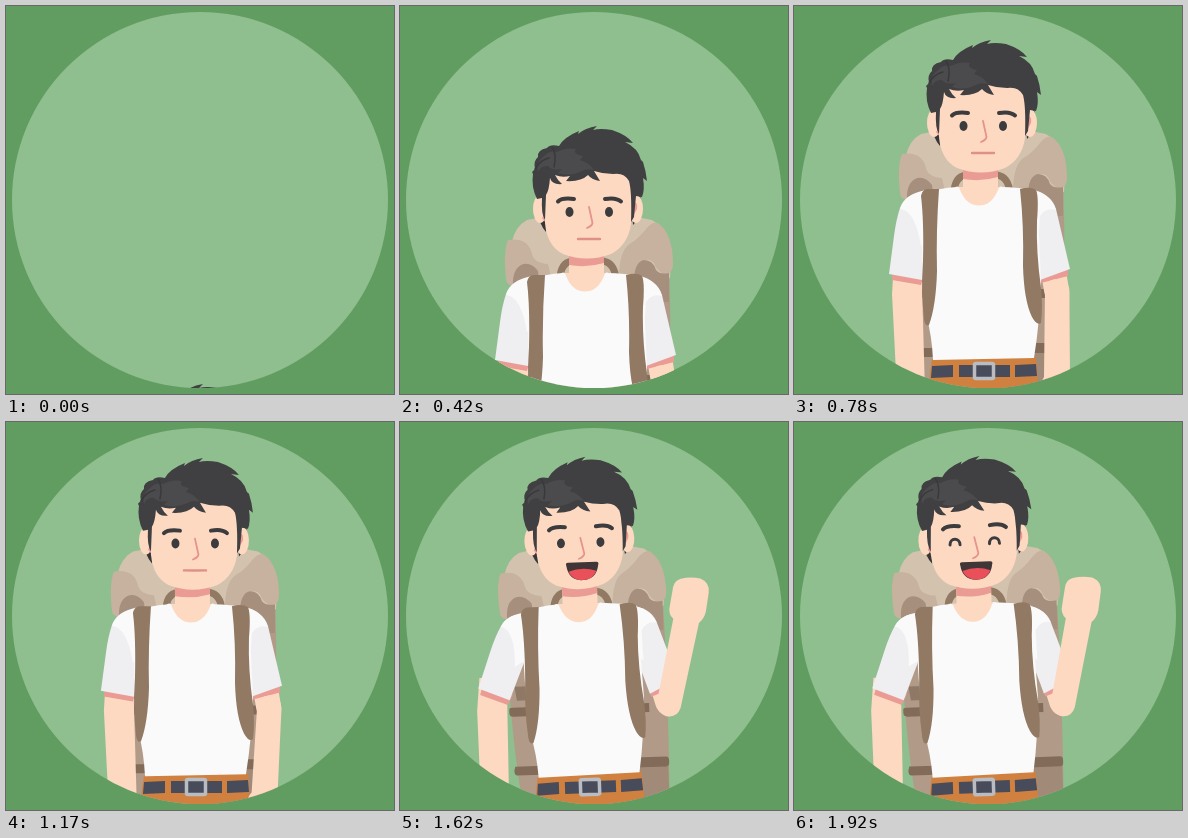
These frames come from a looping animation (388 by 388 pixels, 3 s). An HTML page:

```html
<!DOCTYPE html>
<html lang="en">
<head>
<meta charset="utf-8">
<title>Waving backpacker</title>
<style>
  html, body { margin: 0; width: 100%; height: 100%; overflow: hidden; background: #619d61; }
  svg { display: block; width: 100vw; height: 100vh; }
  .skin { fill: #fdd9c1; }
  .blush { fill: #ea9b93; }
  .white { fill: #fafafa; }
  .shade { fill: #efeef1; }
  .hair { fill: #404042; }
  .strap { fill: #927963; }
  .band { fill: #836b59; }
  .line { fill: none; stroke-linecap: round; stroke-linejoin: round; }
</style>
</head>
<body>
<svg viewBox="0 0 388 388">
  <defs><clipPath id="porthole"><circle cx="194" cy="194" r="188"/></clipPath></defs>
  <rect width="388" height="388" fill="#619d61"/>
  <circle cx="194" cy="194" r="188" fill="#8fbe8f"/>
  <g clip-path="url(#porthole)">
    <g id="person">
      <g id="pack">
        <path fill="#b19b88" d="M113 178L200 165H269Q272 270 269 384H123Q116 340 113 270Z"/>
        <path fill="#a18a78" d="M200 342H269V384H200Z"/>
        <path fill="#8f7966" d="M118 262H133V276H120Z"/>
        <path class="band" d="M112 285Q112 283 115 283H252V292H116Q112 292 112 288ZM116 342H150V351H118Q115 351 115 346ZM235 337H267Q270 337 270 341V343Q270 347 267 347H235Z"/>
        <path fill="#d3c2ae" d="M112 192Q104 140 127 128Q190 114 252 128Q274 140 270 186L210 192Z"/>
        <path fill="#c6b29e" d="M106 187Q103 160 108 148Q128 145 132 162Q134 171 148 172L152 190L115 194Q106 194 106 187Z"/>
        <path fill="#c6b29e" d="M219 182Q220 157 231 151Q238 147 246 137Q253 129 258 131Q273 142 273 172Q273 182 265 182Q257 180 254 171Q248 164 239 172L235 186Z"/>
        <path fill="#a68f7d" d="M113 195Q112 178 121 173Q130 169 138 179L140 195ZM234 190Q234 170 244 168Q253 168 256 178Q260 183 269 181V210H236Z"/>
        <path class="line" stroke="#927963" stroke-width="7" d="M160 188Q160 171 172 169H203Q215 171 216 188"/>
      </g>

      <g id="leftArm">
        <g id="leftForearm">
          <path class="skin" d="M100 255L98 288L103 386H131L128 280V255Z"/>
        </g>
        <path class="blush" d="M99 262L98 274L127 279L130 268Z"/>
        <path class="shade" d="M130 186Q111 188 106 202Q102 214 100 230L95 268L128 274L136 230Z"/>
        <path class="white" d="M132 184Q110 188 106 203Q121 204 127 240L138 230Z"/>
      </g>

      <g id="rightSleeve">
        <path class="line" stroke="#fdd9c1" stroke-width="25" d="M256 245L262.500 284"/>
        <path class="blush" d="M246 268L247 277L274 270L274 260Z"/>
        <path class="shade" d="M236 184Q257 187 262 203L276 263L246 274L236 230Z"/>
        <path class="white" d="M236 183Q257 187 262 204Q252 201 246 210L244 240L234 230Z"/>
      </g>

      <path fill="#d08140" d="M138 353L242 351L245 390H133Z"/>
      <g id="belt">
        <path fill="#484b5a" d="M138 360L159 359V371L137 372ZM165 359H216V371H165ZM221 359L242 358L243 370L221 371Z"/>
        <rect x="180.500" y="357.500" width="19" height="15" rx="1.500" fill="#484b5a" stroke="#b9bdc1" stroke-width="3.500"/>
      </g>

      <path class="white" d="M128 188Q145 182 163 181L206 181Q225 181 243 185L247 275Q246 315 240 352L139 354Q138 330 132 308Q127 260 128 188Z"/>
      <path class="strap" d="M127 190Q128 184 133 183H145Q142 225 143 265Q142 300 135 319Q131 321 130 313Q127 285 129 255Q130 215 127 190Z"/>
      <path class="strap" d="M226 183Q237 180 242 184Q245 190 243 215Q242 246 247 282Q249 301 247 317Q243 320 238 311Q230 295 229 260Q230 220 226 183Z"/>

      <path class="skin" d="M169 155H204V181H209Q203 200 185 200Q167 200 162 181H169Z"/>
      <path class="line" stroke="#fafafa" stroke-width="5" d="M163 183Q170 202 185 202T207 183"/>
      <path class="blush" d="M169 160H204V171Q187 176 169 173Z"/>

      <g id="head">
        <path fill="#363638" d="M136 85H242L239 126L233 133L229 90H147L146 140Q139 132 138 120Z"/>
        <ellipse class="skin" cx="140" cy="117" rx="7" ry="14"/>
        <ellipse class="skin" cx="236" cy="117" rx="7" ry="14"/>
        <path class="blush" d="M142 126L146 120V131ZM233 110Q238 109 237 117L232 126Z"/>
        <path class="skin" d="M144 70H231V132Q228 153 211 162Q187 171 163 162Q147 154 145 131Z"/>
        <path class="hair" d="M137 107Q131 95 133 82L132 80L135 77Q133 69 138 65Q137 58 147 56Q150 52 159 54Q164 45 179 39L178 42Q185 36 197 34L193 38Q200 36 212 38Q227 43 233 51L225 50Q238 56 241 68L243 70Q246 79 247 89L243 86Q245 98 242 105L236 104L234 125L231 130Q232 100 229 89Q224 80 213 82Q203 82 194 79L200 89Q192 88 188 83Q181 90 166 89L170 84Q162 86 155 83Q158 89 162 92Q152 93 150 86Q149 99 146 103L145 128Q141 122 142 106Z"/>
        <path fill="#4b4b4d" d="M138 80Q136 70 143 65Q150 58 157 60Q166 55 176 57Q172 62 183 64L180 68Q188 70 194 78Q186 76 182 79Q170 85 158 81L162 77Q152 79 148 74Q141 73 138 80Z"/>
        <path class="line" stroke="#39393b" stroke-width="1.500" d="M152 55Q157 62 154 75M135 77Q140 68 149 66"/>

        <g id="brows" class="line" stroke="#3c3c3e" stroke-width="4">
          <path d="M158 109.500Q162 105.500 174 107"/>
          <path d="M205 107Q216 105 221 109.500"/>
        </g>
        <g id="openEyes" fill="#3c3c3e">
          <ellipse id="eyeL" cx="169.500" cy="120" rx="4" ry="5"/>
          <ellipse id="eyeR" cx="209" cy="120" rx="4" ry="5"/>
        </g>
        <path id="happyEyes" class="line" stroke="#3c3c3e" stroke-width="3"/>
        <path class="line" stroke="#e6938a" stroke-width="1.800" d="M189 115L192.500 131Q192 134 187 136"/>
        <path id="smile" class="line" stroke="#df9186" stroke-width="2.400"/>
        <g id="laugh">
          <path fill="#403638" d="M176 140H204Q207 140 206 143Q204 158 190 158T174 143Q173 140 176 140Z"/>
          <path fill="#ea5059" d="M176 149Q190 144 204 149Q200 158 190 158T176 149Z"/>
        </g>
      </g>

      <g id="rightArm">
        <path id="rightForearm" class="skin" d="M-12 -14L-12.500 -84Q-19 -88 -18.500 -97L-19 -115Q-19 -122 -13 -125Q-4 -129 6 -129Q16 -127 17 -117L18 -98Q18 -91 13.500 -85L12.500 2Q11 13 0 13Q-12 11 -12 0Z"/>
      </g>
    </g>
  </g>
</svg>
<script>
const LOOP = 3000, STEP = 30;
const el = id => document.getElementById(id);
const set = (id, name, value) => el(id).setAttribute(name, value);
const show = (id, on) => set(id, "visibility", on ? "visible" : "hidden");
const span = (t, from, to) => Math.min(1, Math.max(0, (t - from) / (to - from)));
const mix = (a, b, p) => a + (b - a) * p;
const easeOut = p => 1 - (1 - p) ** 2;
const smooth = p => p * p * (3 - 2 * p);
const cubic = p => p < 0.5 ? 4 * p ** 3 : 1 - 4 * (1 - p) ** 3;
const hump = p => Math.sin(Math.PI * p);

function drawFace(wave, happy) {
  const smiling = Math.min(1, wave / 0.65);
  const half = mix(11, 17, smiling), curve = 14 * smiling;
  const mid = mix(189, 190.5, wave);
  const open = span(wave, 0.68, 1);
  show("smile", open === 0);
  set("smile", "d", `M${mid - half} 147Q${mid} ${147 + curve} ${mid + half} 147`);
  show("laugh", open > 0);
  set("laugh", "transform", `translate(0 140) scale(1 ${mix(0.3, 1, open)}) translate(0 -140.5)`);

  set("brows", "transform", `translate(0 ${-3 * wave - 0.5 * happy})`);
  const closed = happy > 0.5;
  show("openEyes", !closed);
  show("happyEyes", closed);
  for (const id of ["eyeL", "eyeR"]) set(id, "ry", mix(5, 1.5, Math.min(1, happy * 2)));
  const top = 122 - span(happy, 0.5, 1) * 7.5;
  const arc = x => `M${x - 5} 122C${x - 5} ${top} ${x + 5} ${top} ${x + 5} 122`;
  set("happyEyes", "d", arc(169.5) + arc(209));
}

function draw(t) {
  const rise = mix(344, 0, easeOut(span(t, 270, 570)));
  const stretch = 0.025 * (smooth(span(t, 420, 540)) - smooth(span(t, 540, 780)));
  const turn = span(t, 1140, 1410), nod = span(t, 1590, 1920);
  const wave = cubic(turn), happy = smooth(nod);
  const height = 1 + stretch - 0.018 * hump(turn) - 0.008 * hump(nod);
  const lean = -2 * wave, upper = -5.5 * wave;

  set("person", "transform",
    `translate(0 ${rise + 375}) scale(1 ${height}) translate(0 -375) rotate(${lean} 190 365)`);
  set("leftArm", "transform", `rotate(${12.5 * wave} 114 205)`);
  set("leftForearm", "transform", `translate(${-2.5 * wave} 0) rotate(${-10 * wave} 113 275)`);

  const shoulder = `rotate(${upper} 247 200)`;
  set("rightSleeve", "transform", shoulder);
  set("rightArm", "transform", shoulder);
  const forearm = mix(180, 371.5, wave ** 0.8) - happy;
  set("rightForearm", "transform", `translate(263.5 286) rotate(${forearm - lean - upper})`);
  drawFace(wave, happy);
}

const start = performance.now();
function tick() {
  const t = (performance.now() - start) % LOOP;
  draw(Math.floor(t / STEP) * STEP);
  requestAnimationFrame(tick);
}
tick();
</script>
</body>
</html>
```
